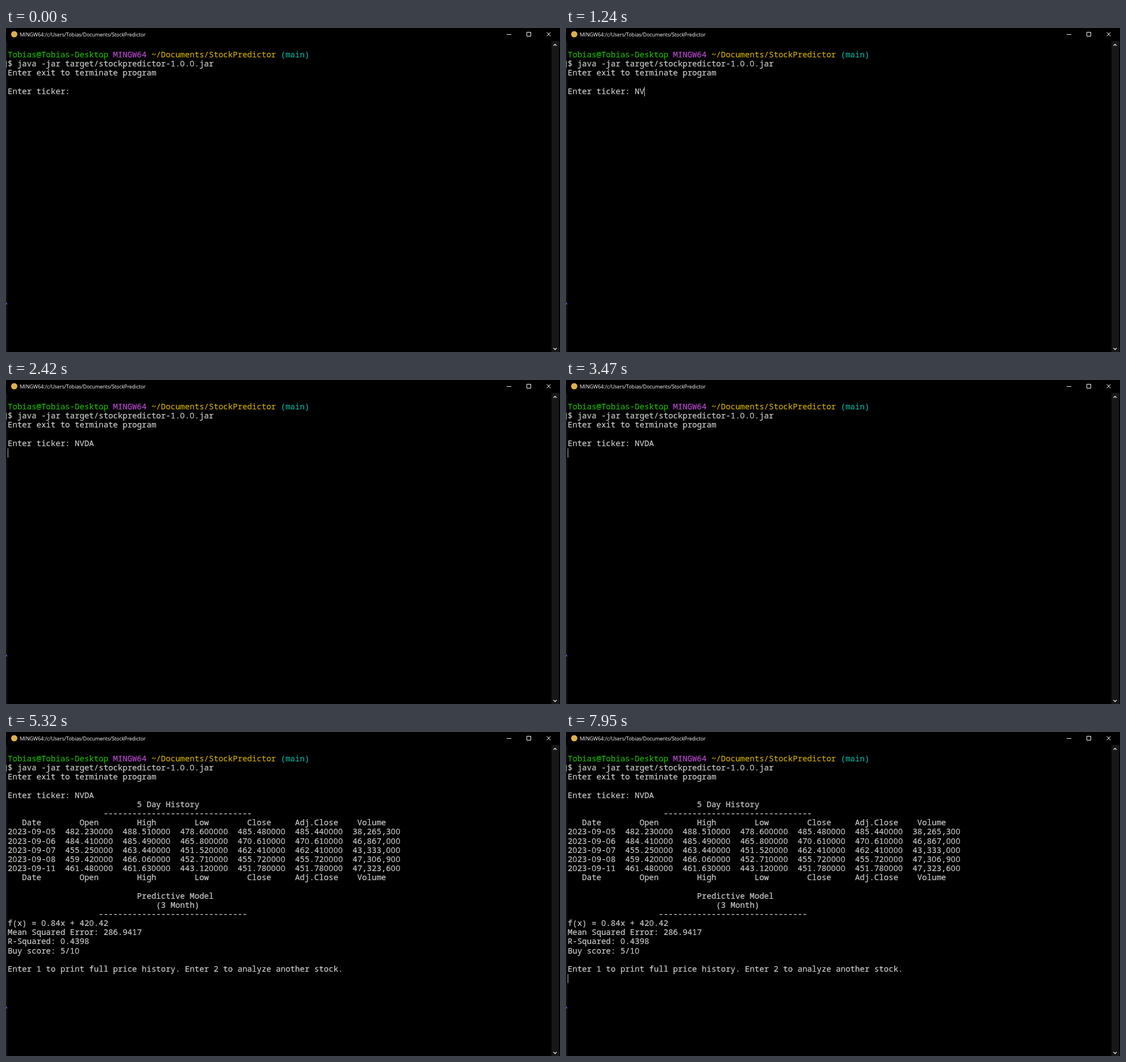
An HTML page that plays this animation: 977x573 px, repeating every 8000 ms.

```html
<!DOCTYPE html>
<html lang="en">
<head>
<meta charset="utf-8">
<title>Terminal</title>
<style>
  html, body { margin: 0; width: 100%; height: 100%; overflow: hidden; background: #000; }
  svg { display: block; }
  .term { font: 14.08px "Noto Sans Mono", "DejaVu Sans Mono", monospace; color: #ccc; }
  .term text { white-space: pre; fill: currentColor; stroke: currentColor; stroke-width: .2px; }
  /* plain zeros, padded to the cell width */
  .zero { font-family: "Open Sans", "Noto Sans", sans-serif; letter-spacing: .394px; }
  .user { color: #1cb400; }
  .host { color: #b94bd0; }
  .path { color: #cca900; }
  .branch { color: #00b2a3; }
  .title { font: 8.86px "Open Sans", "Noto Sans", sans-serif; fill: #fff; }
  .icon { fill: none; stroke: #fff; }
  .arrow { fill: none; stroke: #d8d8d8; stroke-width: 1.5; }
</style>
</head>
<body>
<svg width="977" height="573" viewBox="0 0 977 573">
  <rect width="977" height="573"/>
  <circle cx="14.5" cy="11" r="5.5" fill="#e0b04a"/>
  <text class="title" x="24.5" y="14.5">MINGW64:/c/Users/Tobias/Documents/StockPredictor</text>
  <path class="icon" d="M883 11.5h8M918.5 7.5h7v7h-7zM953.5 7.5l7 7M960.5 7.5l-7 7"/>
  <rect x="962" y="23" width="13" height="550" fill="#171717"/>
  <path class="arrow" d="M965.5 31.5l2.8-2.8l2.8 2.8M965.5 566l2.8 2.8l2.8-2.8"/>
  <rect x="1" y="24" width="1" height="549" fill="#202226"/>
  <rect x="0" y="58" width="1" height="12" fill="#a0a0a0"/>
  <rect x="0" y="486" width="2" height="3" fill="#2f62c0"/>
  <g class="term">
    <g id="intro"></g>
    <g id="report"></g>
    <rect id="cursor" width="1" fill="#bfbfbf"/>
  </g>
</svg>
<script>
const CELL = 8.447, LINE = 16.17, LEFT = 3, TOP = 39.7;
const LOOP = 8000, BLINK = 525;
const PROMPT_ROW = 4, PROMPT_COL = 14, REPORT_ROW = 5;

const rule = "-".repeat(31);
const heads = "   Date        Open        High        Low        Close     Adj.Close    Volume";
const reportText = `
                           5 Day History
                    ${rule}
${heads}
2023-09-05  482.230000  488.510000  478.600000  485.480000  485.440000  38,265,300
2023-09-06  484.410000  485.490000  465.800000  470.610000  470.610000  46,867,000
2023-09-07  455.250000  463.440000  451.520000  462.410000  462.410000  43,333,000
2023-09-08  459.420000  466.060000  452.710000  455.720000  455.720000  47,306,900
2023-09-11  461.480000  461.630000  443.120000  451.780000  451.780000  47,323,600
${heads}

                           Predictive Model
                               (3 Month)
                   ${rule}
f(x) = 0.84x + 420.42
Mean Squared Error: 286.9417
R-Squared: 0.4398
Buy score: 5/10

Enter 1 to print full price history. Enter 2 to analyze another stock.
`.slice(1).split("\n");

const $ = id => document.getElementById(id);
const intro = $("intro"), report = $("report"), cursor = $("cursor");

function put(group, row, col, text, style = "") {
  const el = document.createElementNS("http://www.w3.org/2000/svg", "text");
  el.setAttribute("x", LEFT + col * CELL);
  el.setAttribute("y", Math.round(52 + row * LINE));
  el.setAttribute("class", style);
  el.innerHTML = text.replace(/0+/g, '<tspan class="zero">$&</tspan>');
  group.append(el);
  return el;
}

put(intro, 0, 0, "Tobias@Tobias-Desktop", "user");
put(intro, 0, 22, "MINGW64", "host");
put(intro, 0, 30, "~/Documents/StockPredictor", "path");
put(intro, 0, 57, "(main)", "branch");
put(intro, 1, 0, "$ java -jar target/stockpredictor-1.0.0.jar");
put(intro, 2, 0, "Enter exit to terminate program");
put(intro, PROMPT_ROW, 0, "Enter ticker:");
const ticker = put(intro, PROMPT_ROW, PROMPT_COL, "");
reportText.forEach((line, i) => put(report, REPORT_ROW + i, 0, line));

// each event restarts the cursor blink
const lastRow = REPORT_ROW + reportText.length - 1;
const events = [
  { at: 60, typed: "", row: PROMPT_ROW },
  { at: 1110, typed: "N", row: PROMPT_ROW },
  { at: 1240, typed: "NV", row: PROMPT_ROW },
  { at: 1500, typed: "NVD", row: PROMPT_ROW },
  { at: 1570, typed: "NVDA", row: PROMPT_ROW },
  { at: 2420, typed: "NVDA", row: REPORT_ROW },
  { at: 3740, typed: "NVDA", row: lastRow }
];

const rowTop = row => Math.round(TOP + row * LINE);
const visible = (el, on) => el.setAttribute("visibility", on ? "visible" : "hidden");

function draw(t) {
  const { at, typed, row } = events.findLast(e => e.at <= t) || events[0];
  const col = row === PROMPT_ROW ? PROMPT_COL + typed.length : 0;
  ticker.textContent = typed;
  visible(report, row === lastRow);
  cursor.setAttribute("x", Math.floor(LEFT + col * CELL));
  cursor.setAttribute("y", rowTop(row));
  cursor.setAttribute("height", rowTop(row + 1) - rowTop(row));
  visible(cursor, Math.floor((t - at) / BLINK) % 2 === 0);
}

const start = performance.now();
function tick() {
  draw((performance.now() - start) % LOOP);
  requestAnimationFrame(tick);
}
tick();
</script>
</body>
</html>
```
